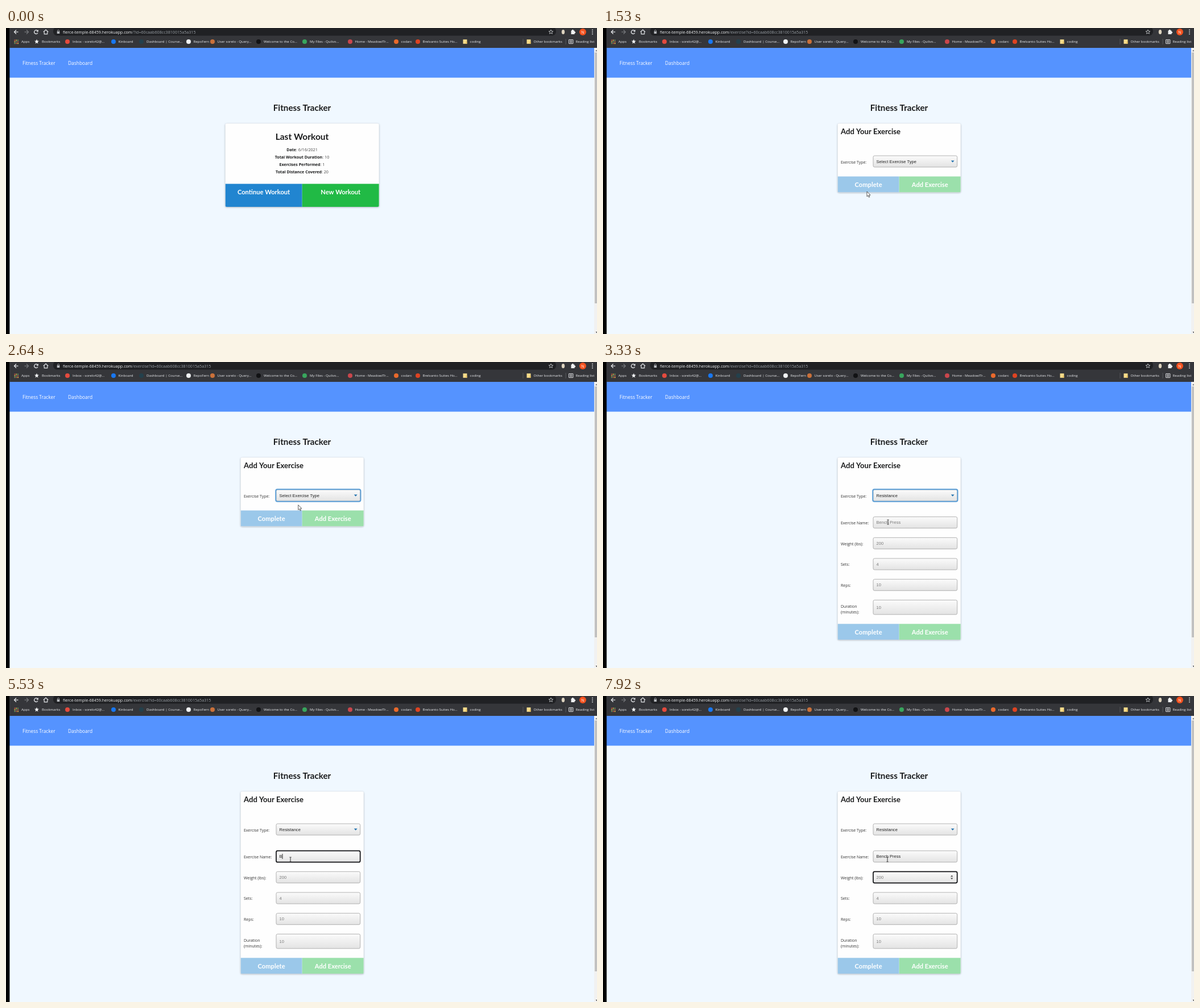
An HTML page with a canvas for the animation above (8000 ms loop, 1039 px wide and 539 px high).

```html
<!DOCTYPE html>
<html lang="en">
<head>
<meta charset="utf-8">
<title>Fitness Tracker</title>
<style>
  html, body { margin: 0; width: 100%; height: 100%; overflow: hidden; background: #f0f8ff; }
  canvas { display: block; }
</style>
</head>
<body>
<canvas id="stage" width="1039" height="539"></canvas>
<script>
const ctx = document.getElementById('stage').getContext('2d');
const LOOP = 8000;
const CENTER = 520.5;
const sans = (size, weight = 400) => `${weight} ${size}px "Open Sans", "Noto Sans", sans-serif`;
const lato = size => `700 ${size}px Lato, sans-serif`;
const FIELD_FONT = '7.55px "Liberation Sans", Arial, sans-serif';

// Times of page events, in ms
const PRESS = 1140, NAVIGATE = 1430, OPEN_SELECT = 2310, CHOOSE = 2690;
const FOCUS_NAME = 3470, TAB = 7360;
const KEY_TIMES = [5350, 5590, 5820, 5980, 6130, 6360, 6590, 6740, 6810, 6880, 7110];
const EXERCISE = 'Bench Press';

// Pointer moves: start, end, steps, target x and y
const POINTER_START = [925, 514];
const MOVES = [
  [290, 1070, 11, 464, 288],
  [1780, 1930, 3, 499.5, 247.5],
  [2010, 2310, 5, 540, 233],
  [2460, 2860, 6, 505, 258],
  [3090, 3330, 4, 501, 282],
  [3930, 4090, 3, 500, 288]
];

function rect(x, y, w, h, color) {
  ctx.fillStyle = color;
  ctx.fillRect(x, y, w, h);
}

function rounded(x, y, w, h, r, fill, stroke, width = 1) {
  ctx.beginPath();
  ctx.roundRect(x, y, w, h, r);
  if (fill) { ctx.fillStyle = fill; ctx.fill(); }
  if (stroke) { ctx.strokeStyle = stroke; ctx.lineWidth = width; ctx.stroke(); }
}

function dot(x, y, r, color) {
  ctx.beginPath();
  ctx.arc(x, y, r, 0, Math.PI * 2);
  ctx.fillStyle = color;
  ctx.fill();
}

function poly(points, fill, stroke, width = 1, closed = true) {
  ctx.beginPath();
  points.forEach(([x, y]) => ctx.lineTo(x, y));
  if (closed) ctx.closePath();
  if (fill) { ctx.fillStyle = fill; ctx.fill(); }
  if (stroke) { ctx.strokeStyle = stroke; ctx.lineWidth = width; ctx.stroke(); }
}

function text(str, x, y, font, color, align = 'left') {
  ctx.font = font;
  ctx.fillStyle = color;
  ctx.textAlign = align;
  ctx.fillText(str, x, y);
  return ctx.measureText(str).width;
}

function star(x, y, r, fill, stroke) {
  const points = Array.from({ length: 10 }, (_, i) => {
    const angle = i * Math.PI / 5 - Math.PI / 2, radius = i % 2 ? r * 0.45 : r;
    return [x + radius * Math.cos(angle), y + radius * Math.sin(angle)];
  });
  poly(points, fill, stroke, 0.8);
}

function arrowIcon(x, dir, color) {
  poly([[x - 3.5 * dir, 7], [x + 3.5 * dir, 7]], null, color, 1.2, false);
  poly([[x, 3.5], [x + 3.5 * dir, 7], [x, 10.5]], null, color, 1.2, false);
}

function drawToolbar(onForm) {
  rect(6, 0, 1033, 35, '#35363a');
  rounded(83, -2, 884, 15.5, 7, '#202124');
  arrowIcon(18, -1, '#e8eaed');
  arrowIcon(36, 1, '#77797d');

  ctx.strokeStyle = '#e8eaed';
  ctx.lineWidth = 1.2;
  ctx.beginPath();
  ctx.arc(53, 7, 3.3, 0.5, 5.5);
  ctx.stroke();
  poly([[56.8, 3], [56.8, 6.5], [53.3, 6.5]], '#e8eaed');
  poly([[65.8, 7], [70, 3], [74.2, 7]], null, '#e8eaed', 1.2, false);
  poly([[67.2, 6.5], [67.2, 10.6], [72.8, 10.6], [72.8, 6.5]], null, '#e8eaed', 1.1, false);

  rect(89.7, 6, 4.6, 4, '#b5b8bc');
  rounded(90.5, 3.5, 3, 4, 1.4, null, '#b5b8bc', 0.8);
  const hostWidth = text('fierce-temple-68459.herokuapp.com', 100, 9.7, sans(7.17), '#f1f3f4');
  const path = onForm ? '/exercise?id=' : '/?id=';
  text(path + '60caab608cc3810015a5a315', 100 + hostWidth, 9.7, sans(7.17), '#9aa0a6');

  star(958, 7, 4, null, '#d5d7da');
  ctx.beginPath();
  ctx.ellipse(979.5, 7, 2.7, 4, 0, 0, Math.PI * 2);
  ctx.fillStyle = '#ddd3bf';
  ctx.fill();
  rect(993.5, 4.5, 6, 6.5, '#f1f3f4');
  dot(996.3, 4.2, 1.5, '#f1f3f4');
  dot(999.7, 7.7, 1.5, '#f1f3f4');
  dot(1014, 7, 6, '#f4511e');
  text('N', 1014, 9.5, sans(7), '#fff', 'center');
  [3.5, 7, 10.5].forEach(y => dot(1031, y, 0.9, '#e8eaed'));
}

function folder(x) {
  rect(x - 3.5, 20.2, 7, 7.6, '#f7dc8b');
  rect(x + 1.5, 24, 2, 3.8, '#e5bd5b');
}

function drawBookmarks() {
  const label = (str, x) => text(str, x, 26.3, sans(6.15), '#e8eaed');
  const appColors = ['#e25b4b', '#efc64a', '#68a86b'];
  for (let i = 0; i < 9; i++) {
    rect(14.5 + (i % 3) * 2.8, 20.7 + Math.floor(i / 3) * 2.8, 1.8, 1.8, appColors[(i + Math.floor(i / 3)) % 3]);
  }
  label('Apps', 27);
  star(54, 24, 4.2, '#f1f3f4');
  label('Bookmarks', 63);

  const sites = [
    [108, '#e34a3e', 'Inbox - sorelo42@...', 117],
    [189, '#1877f2', 'Kinboard', 197.5],
    [238, '#24404c', 'Dashboard | Course...', 247],
    [321, '#f1f3f4', 'RepoFern', 329.5],
    [363, '#c9703a', 'User sorelo - Query...', 371.5],
    [444, '#111214', 'Welcome to the Co...', 453],
    [525, '#38a55d', 'My Files - Quilvo...', 534],
    [605, '#c9464c', 'Home - MeadowlTr...', 613.5],
    [686, '#e8692c', 'codarc', 694.5],
    [724, '#dd4322', 'Brelvanto Suites Ho...', 732.5]
  ];
  sites.forEach(([iconX, color, name, x]) => {
    dot(iconX, 24, 4, color);
    label(name, x);
  });

  folder(807);
  label('coding', 815.5);
  rect(908.5, 19, 1, 10, '#55575b');
  folder(919);
  label('Other bookmarks', 927.5);
  rect(983.5, 19, 1, 10, '#55575b');
  rounded(989.5, 20.5, 7.5, 7, 0.5, null, '#e8eaed', 0.9);
  [22.3, 24, 25.7].forEach(y => rect(991, y - 0.4, 4.5, 0.8, '#e8eaed'));
  label('Reading list', 1001.5);
}

function drawPageFrame() {
  rect(0, 0, 1039, 539, '#f0f8ff');
  rect(6, 35, 1028, 52.5, '#5593ff');
  text('Fitness Tracker', 29, 64.7, sans(8.35), '#fff');
  text('Dashboard', 109, 64.7, sans(8.4), '#fff');
  rect(1034, 35, 5, 504, '#f1f1f1');
  rect(1035, 43, 4, 442, '#c1c1c1');
  poly([[1036, 41], [1038, 38.5], [1039, 40], [1039, 41]], '#777');
  poly([[1036.5, 535], [1039, 535], [1039, 537.5]], '#444');
  rect(0, 0, 6.4, 539, '#000');
  text('Fitness Tracker', CENTER, 146.2, lato(15.2), '#1b1c1d', 'center');
}

function drawCard(x, w, bottom, buttonTop, buttons) {
  ctx.save();
  ctx.shadowColor = 'rgba(80,90,100,.5)';
  ctx.shadowBlur = 3;
  ctx.shadowOffsetY = 0.8;
  rounded(x, 168.3, w, bottom - 168.3, 2.5, '#fefefe');
  ctx.restore();
  ctx.save();
  ctx.beginPath();
  ctx.roundRect(x, 168.3, w, bottom - 168.3, 2.5);
  ctx.clip();
  buttons.forEach(({ color }, i) => rect(x + i * w / 2, buttonTop, w / 2, bottom - buttonTop, color));
  ctx.restore();
  buttons.forEach(({ name }, i) =>
    text(name, x + w * (0.25 + i * 0.5), buttonTop + 18.2, lato(11.15), '#fff', 'center'));
}

function drawSummary(hovered) {
  drawCard(385.5, 270.3, 315, 274.5, [
    { name: 'Continue Workout', color: hovered ? '#1678c2' : '#2185d0' },
    { name: 'New Workout', color: '#21ba45' }
  ]);
  text('Last Workout', CENTER, 197.3, lato(15.5), '#1b1c1d', 'center');
  const rows = [
    ['Date', '6/16/2021'], ['Total Workout Duration', '10'],
    ['Exercises Performed', '1'], ['Total Distance Covered', '20']
  ];
  const bold = sans(7.1, 700), plain = sans(7.2);
  rows.forEach(([name, value], i) => {
    const y = 217 + i * 13;
    ctx.font = bold;
    const nameWidth = ctx.measureText(name).width;
    ctx.font = plain;
    const x = CENTER - (nameWidth + ctx.measureText(': ' + value).width) / 2;
    text(name, x, y, bold, '#1b1c1d');
    text(': ' + value, x + nameWidth, y, plain, '#444');
  });
}

function drawField(y, h, value, color, focused) {
  const fill = ctx.createLinearGradient(0, y, 0, y + h);
  fill.addColorStop(0, '#fbfbfb');
  fill.addColorStop(1, '#e3e3e3');
  rounded(475, y, 147.7, h, 2.5, fill, focused ? '#101114' : '#aaa', focused ? 1.7 : 0.9);
  text(value, 480.5, y + h / 2 + 2.7, FIELD_FONT, color);
}

function drawCaret(x, y) {
  rect(x, y, 0.9, 9, '#111');
}

function drawSuggestions() {
  ctx.save();
  ctx.shadowColor = 'rgba(0,0,0,.4)';
  ctx.shadowBlur = 2;
  rounded(474.5, 293.7, 148.5, 47.3, 1.5, '#28292c');
  ctx.restore();
  text('Nerys', 481, 310, sans(6.5, 600), '#f1f3f4');
  text('Nerys Tolm', 481, 329.4, sans(6.5, 600), '#f1f3f4');
}

function drawForm(t) {
  const expanded = t >= CHOOSE;
  const buttonTop = expanded ? 461.3 : 261.5;
  const label = (str, y) => text(str, 418, y, sans(6.95), '#333');
  drawCard(412.5, 216.3, buttonTop + 28, buttonTop, [
    { name: 'Complete', color: '#9bc8ea' },
    { name: 'Add Exercise', color: '#9be0ab' }
  ]);
  text('Add Your Exercise', 418, 186.7, lato(13.1), '#1b1c1d');

  label('Exercise Type:', 238.5);
  drawField(225, 20, expanded ? 'Resistance' : 'Select Exercise Type', '#222');
  poly([[611.8, 233.6], [617.6, 233.6], [614.7, 236.7]], '#1c6fad');
  if (t >= OPEN_SELECT && t < FOCUS_NAME) rounded(474.2, 224.2, 149.3, 21.6, 3, null, '#5b9fd8', 1.9);
  if (!expanded) return;

  const typed = EXERCISE.slice(0, KEY_TIMES.filter(k => t >= k).length);
  const onName = t >= FOCUS_NAME && t < TAB, onWeight = t >= TAB;
  const grey = '#7b7b7b';
  label('Exercise Name:', 286);
  drawField(272.7, 20, typed || EXERCISE, typed ? '#222' : grey, onName);
  label('Weight (lbs):', 322.6);
  drawField(309.3, 20, '200', grey, onWeight);
  label('Sets:', 359.2);
  drawField(346, 20, '4', grey);
  label('Reps:', 396);
  drawField(382.7, 20, '10', grey);
  label('Duration', 432.6);
  label('(minutes):', 443);
  drawField(419.3, 25.5, '10', grey);

  if (onWeight) {
    poly([[611, 318.3], [615.4, 318.3], [613.2, 315.8]], '#444');
    poly([[611, 320.4], [615.4, 320.4], [613.2, 322.9]], '#444');
    if (t < 7920) drawCaret(480.2, 315);
  }
  if (onName) {
    const blinkOn = t < 3930 || (t >= 4390 && t < 4950);
    if (typed) {
      ctx.font = FIELD_FONT;
      drawCaret(480.5 + ctx.measureText(typed).width, 278);
    } else if (blinkOn) drawCaret(480.2, 278);
    if (!typed) drawSuggestions();
  }
}

function pointerAt(t) {
  let [x, y] = POINTER_START;
  for (const [start, end, steps, toX, toY] of MOVES) {
    if (t < start) break;
    const step = Math.floor((t - start) / (end - start) * (steps - 1) + 0.1) + 1;
    const p = Math.min(1, step / steps);
    const eased = p * (2 - p);
    x += (toX - x) * eased;
    y += (toY - y) * eased;
  }
  return [x, y];
}

function drawArrow(x, y) {
  const shape = [[0, 0], [0, 8.8], [2, 7], [3.4, 10.2], [4.9, 9.5], [3.5, 6.5], [6.1, 6.3]];
  poly(shape.map(([dx, dy]) => [x + dx, y + dy]), '#fff', '#333', 0.8);
}

function drawHand(x, y) {
  ctx.save();
  ctx.translate(x, y);
  ctx.beginPath();
  ctx.moveTo(-0.9, 6.4);
  ctx.lineTo(-0.9, 0.8);
  ctx.quadraticCurveTo(0.1, -0.9, 1.1, 0.8);
  ctx.lineTo(1.1, 3.8);
  ctx.lineTo(4.5, 4.6);
  ctx.quadraticCurveTo(5.8, 5, 5.6, 7);
  ctx.lineTo(4.6, 11);
  ctx.lineTo(0, 11);
  ctx.lineTo(-2.8, 7.2);
  ctx.quadraticCurveTo(-2.6, 5.4, -0.9, 6.4);
  ctx.closePath();
  ctx.fillStyle = '#fff';
  ctx.fill();
  ctx.strokeStyle = '#222';
  ctx.lineWidth = 0.8;
  ctx.stroke();
  ctx.restore();
}

function drawBeam(x, y) {
  rect(x - 0.4, y - 4, 0.9, 8, '#222');
  rect(x - 1.7, y - 4.4, 3.5, 0.8, '#333');
  rect(x - 1.7, y + 3.6, 3.5, 0.8, '#333');
}

function drawPointer(t, x, y, hovered) {
  if (t < 290) return;
  if (hovered) {
    if (t >= PRESS) dot(x + 0.5, y - 0.5, 6, 'rgba(235,215,30,.65)');
    drawHand(x, y);
  } else if (t >= CHOOSE && y > 272) drawBeam(x, y);
  else drawArrow(x, y);
}

function render(t) {
  const onForm = t >= NAVIGATE;
  const [x, y] = pointerAt(t);
  const hovered = !onForm && t >= 290 && x > 385 && x < CENTER && y > 274 && y < 315;
  drawPageFrame();
  drawToolbar(onForm);
  drawBookmarks();
  if (onForm) drawForm(t);
  else drawSummary(hovered);
  drawPointer(t, x, y, hovered);
}

const startTime = performance.now();
function tick() {
  render((performance.now() - startTime) % LOOP);
  requestAnimationFrame(tick);
}
tick();
</script>
</body>
</html>
```
